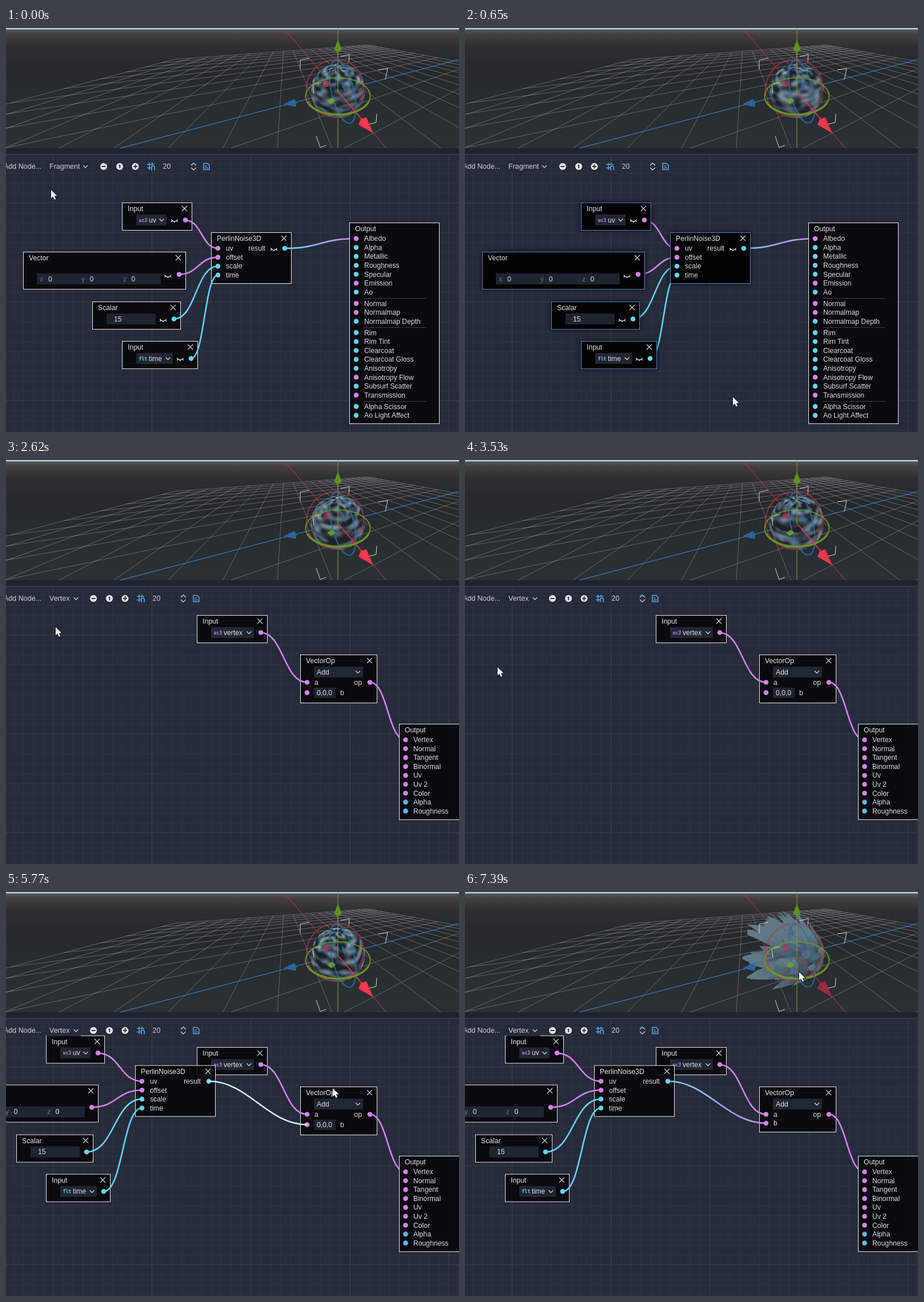
These frames come from a looping animation (793 px wide and 706 px high, 7410 ms). An HTML page with a canvas:

```html
<!DOCTYPE html>
<html lang="en">
<head>
<meta charset="utf-8">
<title>Shader graph</title>
<style>
html, body { margin: 0; width: 793px; height: 706px; overflow: hidden; background: #262b3a; }
canvas { display: block; }
</style>
</head>
<body>
<canvas id="stage" width="793" height="706"></canvas>
<script>
const cv = document.getElementById('stage'), g = cv.getContext('2d');
const LOOP = 7410, PINK = '#d680ec', CYAN = '#60d4f6', BLUE = '#5eb5ee', BG = '#262b3a';
const FONT = '"Liberation Sans", Arial, sans-serif';
const clamp = (v, a, b) => Math.max(a, Math.min(b, v));

/* ---------- drawing helpers ---------- */
function text(s, x, y, col = '#dcdde0', size = 12.2, align = 'left') {
  g.font = size + 'px ' + FONT;
  g.textAlign = align;
  g.fillStyle = col;
  g.fillText(s, x, y + 4.2);
}
function path(pts, col, w = 1, close = false, c = g) {
  c.beginPath();
  pts.forEach((p, i) => i ? c.lineTo(p[0], p[1]) : c.moveTo(p[0], p[1]));
  if (close) c.closePath();
  c.strokeStyle = col;
  c.lineWidth = w;
  c.stroke();
}
function poly(pts, col, c = g) {
  c.beginPath();
  pts.forEach(p => c.lineTo(p[0], p[1]));
  c.closePath();
  c.fillStyle = col;
  c.fill();
}
function dot(x, y, r, col) {
  g.beginPath();
  g.arc(x, y, r, 0, 7);
  g.fillStyle = col;
  g.fill();
}
function box(x, y, w, h, col) { g.fillStyle = col; g.fillRect(x, y, w, h); }
function frame(x, y, w, h, col) { g.strokeStyle = col; g.lineWidth = 1; g.strokeRect(x, y, w, h); }
function chevron(x, y, col = '#c4c7ce') { path([[x - 4, y - 2], [x, y + 2], [x + 4, y - 2]], col, 1.4); }
function ring(x, y, rx, ry, rot, col, w, a = 0, b = Math.PI * 2, c = g) {
  c.beginPath();
  c.ellipse(x, y, rx, ry, rot, a, b);
  c.strokeStyle = col;
  c.lineWidth = w;
  c.stroke();
}

/* ---------- noise ---------- */
let seed = 11;
const rnd = () => (seed = (seed * 16807) % 2147483647) / 2147483647;
const perm = Array.from({ length: 256 }, (_, i) => i);
for (let i = 255; i > 0; i--) {
  const j = Math.floor(rnd() * (i + 1));
  [perm[i], perm[j]] = [perm[j], perm[i]];
}
const hash = (x, y, z) => perm[(perm[(perm[x & 255] + y) & 255] + z) & 255];
const fade = t => t * t * t * (t * (t * 6 - 15) + 10);
const mix = (a, b, t) => a + (b - a) * t;
function grad(h, x, y, z) {
  h &= 15;
  const u = h < 8 ? x : y, v = h < 4 ? y : h === 12 || h === 14 ? x : z;
  return (h & 1 ? -u : u) + (h & 2 ? -v : v);
}
function noise(x, y, z) {
  const X = Math.floor(x), Y = Math.floor(y), Z = Math.floor(z);
  x -= X; y -= Y; z -= Z;
  const u = fade(x), v = fade(y), w = fade(z);
  const n = (i, j, k) => grad(hash(X + i, Y + j, Z + k), x - i, y - j, z - k);
  const row = (j, k) => mix(n(0, j, k), n(1, j, k), u);
  return mix(mix(row(0, 0), row(1, 0), v), mix(row(0, 1), row(1, 1), v), w);
}
const SCALE = 15;

/* ---------- 3D view ---------- */
const C = [581, 110], R = 47.5;
const RIGHT = [.4, 0, -.916], UP = [-.468, .857, -.24], TOWARD = [.79, .515, .345];
const dot3 = (a, b) => a[0] * b[0] + a[1] * b[1] + a[2] * b[2];

// Floor plane mapped with the two vanishing points of its axes.
function floorLine(c, u0, v0, u1, v1) {
  const A = .2037, B = .0979, near = .1;
  const W = (u, v) => 1 + u * A + v * B;
  const a = W(u0, v0), b = W(u1, v1);
  if (a < near && b < near) return;
  const k = (near - a) / (b - a), uk = mix(u0, u1, k), vk = mix(v0, v1, k);
  if (a < near) { u0 = uk; v0 = vk; }
  if (b < near) { u1 = uk; v1 = vk; }
  const P = (u, v) => {
    const w = W(u, v);
    return [(580 + u * A * 488 + v * B * 992) / w, 3 + 107 / w];
  };
  path([P(u0, v0), P(u1, v1)], 'rgba(190,196,196,.38)', 1, false, c);
}

const back = document.createElement('canvas');
back.width = 793; back.height = 706;
(function paintBack(c) {
  const sky = c.createLinearGradient(0, 0, 0, 210);
  [[0, '#b9dcec'], [.008, '#a9c9d6'], [.017, '#54514e'], [.06, '#403e3d'], [.16, '#2d2e30'],
   [.35, '#25292c'], [1, '#2a3134']].forEach(s => sky.addColorStop(s[0], s[1]));
  c.fillStyle = sky;
  c.fillRect(0, 0, 793, 210);
  c.save();
  c.beginPath();
  c.rect(0, 0, 793, 210);
  c.clip();
  for (let i = -10; i <= 10; i++) {
    if (!i) continue;
    floorLine(c, i, -10, i, 10);
    floorLine(c, -10, i, 10, i);
  }
  path([[200, 210], [793, 55]], '#3a84dc', 1.1, false, c);
  path([[489, 4], [666, 210]], '#b93247', 1.1, false, c);
  path([[581, 0], [581, 210]], '#7c9c30', 1.1, false, c);
  c.restore();

  c.fillStyle = BG;
  c.fillRect(0, 210, 793, 496);
  const line = (x, y, w, h, major) => {
    c.fillStyle = major ? '#3a4050' : '#2d3342';
    c.fillRect(Math.round(x), Math.round(y), w, h);
  };
  for (const major of [false, true]) {
    for (let i = -5; i < 45; i++) {
      if ((i % 10 === 0) !== major) continue;
      line(82.2 + i * 17.31, 222, 1, 484, major);
      line(0, 305.2 + i * 17.31, 793, 1, major);
    }
  }
  c.fillStyle = '#1f232e';
  c.fillRect(0, 210, 793, 10);
  c.fillStyle = '#343a4b';
  c.fillRect(0, 220, 793, 2);
  c.fillStyle = BG;
  c.fillRect(0, 222, 793, 3);
})(back.getContext('2d'));

const BALL = 98;
const ballCv = document.createElement('canvas');
ballCv.width = ballCv.height = BALL;
const ballCx = ballCv.getContext('2d'), ballImg = ballCx.createImageData(BALL, BALL), ballPts = [];
for (let j = 0; j < BALL; j++) for (let i = 0; i < BALL; i++) {
  const x = (i + .5 - BALL / 2) / R, y = (BALL / 2 - j - .5) / R, r = Math.hypot(x, y);
  if (r > 1.02) continue;
  const d = Math.sqrt(Math.max(0, 1 - r * r));
  const n = [0, 1, 2].map(k => RIGHT[k] * x + UP[k] * y + TOWARD[k] * d);
  ballPts.push({
    at: (j * BALL + i) * 4,
    u: (Math.atan2(n[0], n[2]) / (2 * Math.PI) + .5) * SCALE,
    v: Math.acos(clamp(n[1], -1, 1)) / Math.PI * SCALE,
    light: .8 + .25 * n[1], rim: Math.pow(1 - d, 3) * 34,
    a: clamp((1.01 - r) * R, 0, 1) * 255
  });
}
function ball(sec) {
  const px = ballImg.data;
  for (const p of ballPts) {
    const l = clamp(noise(p.u, p.v, sec) * .95 + .36, 0, 1) * p.light;
    px[p.at] = 26 + l * 108 + p.rim * .8;
    px[p.at + 1] = 33 + l * 130 + p.rim;
    px[p.at + 2] = 39 + l * 142 + p.rim * 1.1;
    px[p.at + 3] = p.a;
  }
  ballCx.putImageData(ballImg, 0, 0);
  g.drawImage(ballCv, C[0] - BALL / 2, C[1] - BALL / 2);
}

// Sphere mesh pushed along (1,1,1) by the noise value.
function spiky(sec) {
  const NU = 64, NV = 32, pts = [], faces = [];
  for (let j = 0; j <= NV; j++) for (let i = 0; i <= NU; i++) {
    const a = (i / NU - .5) * 2 * Math.PI, b = j / NV * Math.PI;
    const n = noise(i / NU * SCALE, j / NV * SCALE, sec) * 1.25;
    const N = [Math.sin(a) * Math.sin(b), Math.cos(b), Math.cos(a) * Math.sin(b)];
    const p = N.map(v => v + n), d = dot3(p, TOWARD), s = 46 / (1 - d / 3.9);
    pts.push({ p: [C[0] + dot3(p, RIGHT) * s, C[1] - dot3(p, UP) * s], d, n, l: N[1] });
  }
  for (let j = 0; j < NV; j++) for (let i = 0; i < NU; i++) {
    const k = j * (NU + 1) + i, q = [k, k + 1, k + NU + 2, k + NU + 1].map(m => pts[m]);
    const avg = f => (q[0][f] + q[1][f] + q[2][f] + q[3][f]) / 4;
    faces.push({ q, d: avg('d'), n: avg('n'), l: avg('l') });
  }
  faces.sort((a, b) => a.d - b.d);
  for (const f of faces) {
    const s = clamp(.76 + f.n * .6 + f.l * .12, .45, 1.06);
    const col = `rgb(${92 * s | 0},${116 * s | 0},${129 * s | 0})`, pos = f.q.map(v => v.p);
    poly(pos, col);
    path(pos, col, .6, true);
  }
}

function gizmo(dim) {
  const W = '#d5d8d8';
  [[[515, 72], [515, 56], [531, 53]], [[586, 50], [601, 46], [600, 60]], [[652, 73], [668, 71], [664, 90]],
   [[539, 115], [537, 99], [552, 95]], [[649, 150], [648, 165], [636, 168]], [[543, 189], [550, 209], [560, 205]]]
    .forEach(p => path(p, W, 1));
  path([[581, 40], [581, 112]], '#7c9c30', 1.2);
  ring(576, 105, 49, 51, .7, 'rgba(190,50,72,.62)', 2.2);
  ring(589.5, 111.5, 19.5, 56, -.23, 'rgba(45,110,170,.72)', 2.6);
  ring(581, 119.5, 56.5, 32.5, 0, 'rgba(115,155,30,.8)', 2.2);
  ring(581, 119.5, 56, 31.5, 0, 'rgba(115,155,30,.75)', 3.4, .3, 2.85);
  poly([[556, 95], [567, 92], [567, 101], [556, 104]], 'rgba(200,50,72,.65)');
  poly([[562, 127], [570, 122], [577, 127], [569, 133]], 'rgba(118,165,32,.85)');
  poly([[588, 93], [594, 100], [594, 110], [588, 103]], 'rgba(42,105,165,.8)');
  poly([[581, 20], [588, 39], [581, 42], [574, 39]], '#638f22');
  poly([[486, 133], [504, 124], [509, 130], [507, 138]], '#2a649b');
  const red = dim ? '#9b2c40' : '#f43650';
  path([[582, 112], [626, 163]], red, 1.4);
  poly([[643, 184], [617, 169], [621, 159], [631, 156]], red);
}

/* ---------- graph ---------- */
function node(x, y, w, h, title, sel, closable = true) {
  g.save();
  if (sel) { g.shadowColor = 'rgba(0,0,0,.7)'; g.shadowBlur = 8; }
  box(x, y, w, h, sel ? '#020203' : 'rgba(5,5,8,.88)');
  g.restore();
  frame(x + .5, y + .5, w - 1, h - 1, sel ? '#4f83c4' : '#e8e9eb');
  text(title, x + 10, y + 11, '#e4e5e8');
  if (!closable) return;
  const cx = x + w - 13.5, cy = y + 10.5;
  path([[cx - 4.5, cy - 4.5], [cx + 4.5, cy + 4.5]], '#c9cbd0', 1.3);
  path([[cx + 4.5, cy - 4.5], [cx - 4.5, cy + 4.5]], '#c9cbd0', 1.3);
}
const FIELD = '#1f2431';
function port(x, y, col) { dot(x, y, 4.3, col); }
function eye(x, y) {
  ring(x, y - 3.5, 5.6, 4.5, 0, '#e4e5e8', 1.4, .25, 2.9);
  [-4.4, 0, 4.4].forEach(d => path([[x + d, y + (d ? 0 : 1)], [x + d * 1.3, y + (d ? 2 : 3.2)]], '#e4e5e8', 1.2));
}
function typed(x, y, w, tag, col, label) {
  box(x, y - 9.5, w, 19, '#212633');
  g.font = 'bold 8.2px "DejaVu Sans Mono", monospace';
  g.textAlign = 'left';
  g.fillStyle = col;
  g.fillText(tag, x + 4.5, y + 3);
  text(label, x + 22, y);
  chevron(x + w - 8.5, y);
}
function inputNode(x, y, w, tag, col, label, drop, sel, hasEye) {
  node(x, y, w, 49, 'Input', sel);
  typed(x + 25, y + 30.5, drop, tag, col, label);
  if (hasEye) eye(x + w - 31, y + 32);
  port(x + w - 12, y + 30.5, col);
}
function wire(x0, y0, x1, y1, a, b = a) {
  const k = x1 > x0 ? Math.min(69, (x1 - x0) / 2) : 69;
  const gr = g.createLinearGradient(x0, y0, x1, y1);
  gr.addColorStop(0, a);
  gr.addColorStop(1, b);
  g.beginPath();
  g.moveTo(x0, y0);
  g.bezierCurveTo(x0 + k, y0, x1 - k, y1, x1, y1);
  g.strokeStyle = gr;
  g.lineWidth = 2.6;
  g.stroke();
}

// The five copied nodes; without the preview eye they are 20 px narrower.
function nodeGroup(dx, dy, hasEye, sel, wires) {
  const cut = hasEye ? 0 : 20;
  const list = [
    [203, 305, 123, 49, s => inputNode(203, 305, 123 - cut, 'uc3', PINK, 'uv', 53, s, hasEye)],
    [30, 391, 285, 66, s => {
      node(30, 391, 285 - cut, 66, 'Vector', s);
      box(54, 429, 217, 19, FIELD);
      ['x', 'y', 'z'].forEach((c, i) => {
        text(c, 59 + i * 73, 438.5, '#6d717b');
        text('0', 74 + i * 72.7, 438.5);
      });
      if (hasEye) eye(283.5, 434);
      port(303 - cut, 430.5, PINK);
    }],
    [151, 478, 155, 49, s => {
      node(151, 478, 155 - cut, 49, 'Scalar', s);
      box(176, 499, 86, 19, FIELD);
      text('15', 189, 508.5);
      if (hasEye) eye(275, 511);
      port(294 - cut, 508.5, CYAN);
    }],
    [203, 547, 133, 49, s => inputNode(203, 547, 133 - cut, 'flt', CYAN, 'time', 64, s, hasEye)],
    [359, 357, 141, 90, s => {
      node(359, 357, 141, 90, 'PerlinNoise3D', s);
      ['uv', 'offset', 'scale', 'time'].forEach((n, i) => {
        text(n, 385, 385 + i * 15.6);
        port(371, 385 + i * 15.6, i < 2 ? PINK : CYAN);
      });
      text('result', hasEye ? 454 : 474, 385, '#dcdde0', 12.2, 'right');
      if (hasEye) eye(469, 387);
      port(488, 385, CYAN);
    }]
  ];
  g.save();
  g.translate(dx, dy);
  const isSel = n => sel && sel(n);
  list.filter(n => !isSel(n)).forEach(n => n[4](false));
  wire(314 - cut, 336, 371, 385, PINK);
  wire(303 - cut, 430.5, 371, 400.6, PINK);
  wire(294 - cut, 508.5, 371, 416.2, CYAN);
  wire(324 - cut, 577.5, 371, 431.8, CYAN);
  if (wires) wires();
  list.filter(isSel).forEach(n => n[4](true));
  g.restore();
}

const OUT = ['Albedo*', 'Alpha', 'Metallic', 'Roughness', 'Specular', 'Emission*', 'Ao', '',
  'Normal*', 'Normalmap*', 'Normalmap Depth', '', 'Rim', 'Rim Tint', 'Clearcoat', 'Clearcoat Gloss',
  'Anisotropy', 'Anisotropy Flow*', 'Subsurf Scatter', 'Transmission*', '', 'Alpha Scissor', 'Ao Light Affect'];
function fragmentGraph(sel) {
  nodeGroup(0, 0, true, sel, () => wire(488, 385, 613, 368, CYAN, PINK));
  node(601, 340, 158, 352, 'Output', false, false);
  let y = 368;
  for (const s of OUT) {
    if (!s) {
      box(626, Math.round(y - 5.5), 110, 1, '#3a3c42');
      y += 4.3;
      continue;
    }
    port(613, y, s.endsWith('*') ? PINK : CYAN);
    text(s.replace('*', ''), 627, y);
    y += 15.58;
  }
}

function vertexGraph(t, mouse) {
  const done = t >= 5900, pasted = t >= 4020;
  inputNode(334, 271, 124, 'uc3', PINK, 'vertex', 75, false, false);
  node(515, 340, 135, done ? 80 : 85, 'VectorOp', false);
  box(539, 361, 86, 19, '#212633');
  text('Add', 544, 370.5);
  chevron(616, 370.5);
  text('a', 540, 388.5);
  text('op', 623, 388.5, '#dcdde0', 12.2, 'right');
  if (done) text('b', 540, 404);
  else {
    box(539, 398, 38, 18, FIELD);
    text('0,0,0', 544, 406.5);
    text('b', 585, 406.5);
  }
  port(527, 388.5, PINK);
  port(527, done ? 404 : 406.5, PINK);
  port(637, 388.5, PINK);
  wire(445, 301.5, 527, 388.5, PINK);
  wire(637, 388.5, 699.5, 489, PINK);

  node(688, 461, 150, 168, 'Output', false, false);
  ['Vertex', 'Normal', 'Tangent', 'Binormal', 'Uv', 'Uv 2', 'Color', 'Alpha', 'Roughness'].forEach((s, i) => {
    port(699.5, 489 + i * 15.55, i < 7 ? PINK : BLUE);
    text(s, 713, 489 + i * 15.55);
  });
  if (!pasted) return;
  nodeGroup(-133, -54.3, false);
  if (done) wire(354.5, 330.5, 527, 404, '#78d0f2', '#c08cec');
  else if (t >= 5200) wire(354.5, 330.5, 527, 406.5, '#c4f8fb', '#d2f2ef');
  else if (t >= 4780) wire(354.5, 330.5, mouse[0], mouse[1], CYAN);
}

function toolbar(vertex, menu) {
  const label = vertex ? 'Vertex' : 'Fragment', s = vertex ? -18 : 0, icon = '#e4e6ea', hi = '#5aaae8';
  text('Add Node...', 62, 242, '#cfd2d8', 12.5, 'right');
  box(71, 232, 78 + s, 20, menu ? '#20242f' : BG);
  if (menu) frame(71.5, 232.5, 77, 19, '#5584c8');
  text(label, 76, 242, menu ? '#5f96de' : '#cfd2d8', 12.5);
  chevron(139 + s * .92, 242, menu ? '#5f96de' : '#c4c7ce');
  [171, 199, 226.5].forEach((x, i) => {
    dot(x + s, 242, 6, icon);
    if (i === 1) { box(x + s - .6, 239, 1.8, 6, BG); box(x + s - 1.6, 239.6, 1.4, 1.4, BG); }
    else box(x + s - 3.5, 241.1, 7, 1.8, BG);
    if (i === 2) box(x + s - .9, 238.5, 1.8, 7, BG);
  });
  const hx = 254 + s;
  path([[hx - 3, 235], [hx - 3, 248]], hi, 1.4);
  path([[hx - 7, 238.5], [hx + 6, 238.5]], hi, 1.4);
  path([[hx - 7, 244.5], [hx, 244.5]], hi, 1.4);
  path([[hx + 2, 235], [hx + 2, 239]], hi, 1.4);
  ring(hx + 3.5, 244, 2.7, 3, 0, hi, 1.6, Math.PI, Math.PI * 2);
  path([[hx + .8, 244], [hx + .8, 248.5]], hi, 1.6);
  path([[hx + 6.2, 244], [hx + 6.2, 248.5]], hi, 1.6);
  text('20', 274.5 + s, 242, '#cfd2d8', 12.5);
  path([[324 + s, 240], [328.5 + s, 236], [333 + s, 240]], '#c4c7ce', 1.4);
  path([[324 + s, 244], [328.5 + s, 248], [333 + s, 244]], '#c4c7ce', 1.4);
  const d = 351 + s;
  path([[d - 5, 236.5], [d + 1.5, 236.5], [d + 5, 240], [d + 5, 247.5], [d - 5, 247.5]], hi, 1.5, true);
  path([[d - 3, 241], [d + 1, 241]], hi, 1.3);
  path([[d - 3, 244.5], [d + 3, 244.5]], hi, 1.3);
  if (!menu) return;
  box(71, 252, 85, 62, '#343b4e');
  frame(71.5, 252.5, 84, 61, '#566f9c');
  ['Vertex', 'Fragment', 'Light'].forEach((n, i) => {
    const y = 266 + i * 17.2;
    dot(84.5, y, 6, '#4a5060');
    if (i === 1) { dot(84.5, y, 5.4, '#5b6170'); dot(84.5, y, 3, '#f0f1f3'); }
    text(n, 95, y, '#d3d6dc', 12.5);
  });
}

/* ---------- pointer ---------- */
const KEYS = [[0, 79, 283], [60, 80, 285], [600, 469, 645], [790, 469, 645], [1400, 106, 243], [1640, 106, 243],
  [1930, 101, 260], [2320, 101, 262], [3060, 62, 345], [3250, 46, 386], [3480, 57, 362], [3850, 57, 362],
  [4500, 331, 323], [4600, 331, 323], [4760, 354, 330], [5200, 527, 403], [5400, 528, 403], [5740, 572, 343],
  [5800, 572, 343], [6120, 590, 195], [6700, 592, 150], [6880, 592, 150], [7360, 585, 140], [LOOP, 585, 140]];
function pointerAt(t) {
  let i = 1;
  while (KEYS[i][0] < t) i++;
  const a = KEYS[i - 1], b = KEYS[i], k = (t - a[0]) / (b[0] - a[0]), e = k * k * (3 - 2 * k);
  return [mix(a[1], b[1], e), mix(a[2], b[2], e)];
}
function pointer([x, y]) {
  const shape = [[0, 0], [0, 14.5], [3.3, 11.4], [5.7, 16.8], [8.2, 15.7], [5.9, 10.5], [10.3, 10.3]]
    .map(p => [x + p[0], y + p[1]]);
  path(shape, '#15171c', 1.8, true);
  poly(shape, '#fff');
}

function draw(t) {
  const mouse = pointerAt(t), vertex = t >= 2320, done = t >= 5900, sec = t / 1000;
  g.drawImage(back, 0, 0);
  g.save();
  g.beginPath();
  g.rect(0, 0, 793, 210);
  g.clip();
  if (done) spiky(sec); else ball(sec);
  gizmo(done);
  g.restore();

  g.save();
  g.beginPath();
  g.rect(0, 222, 793, 484);
  g.clip();
  if (vertex) vertexGraph(t, mouse);
  else {
    const touched = n => t >= 600 || (t > 60 && mouse[0] > n[0] && mouse[1] > n[1]);
    fragmentGraph(touched);
    if (t > 60 && t < 600) {
      const w = mouse[0] - 79, h = mouse[1] - 283;
      box(79, 283, w, h, 'rgba(105,155,232,.16)');
      frame(79.5, 283.5, w, h, 'rgba(105,155,232,.5)');
    }
  }
  g.restore();
  toolbar(vertex, t >= 1540 && !vertex);
  pointer(mouse);
}

const start = performance.now();
function tick() {
  draw((performance.now() - start) % LOOP);
  requestAnimationFrame(tick);
}
tick();
</script>
</body>
</html>
```
